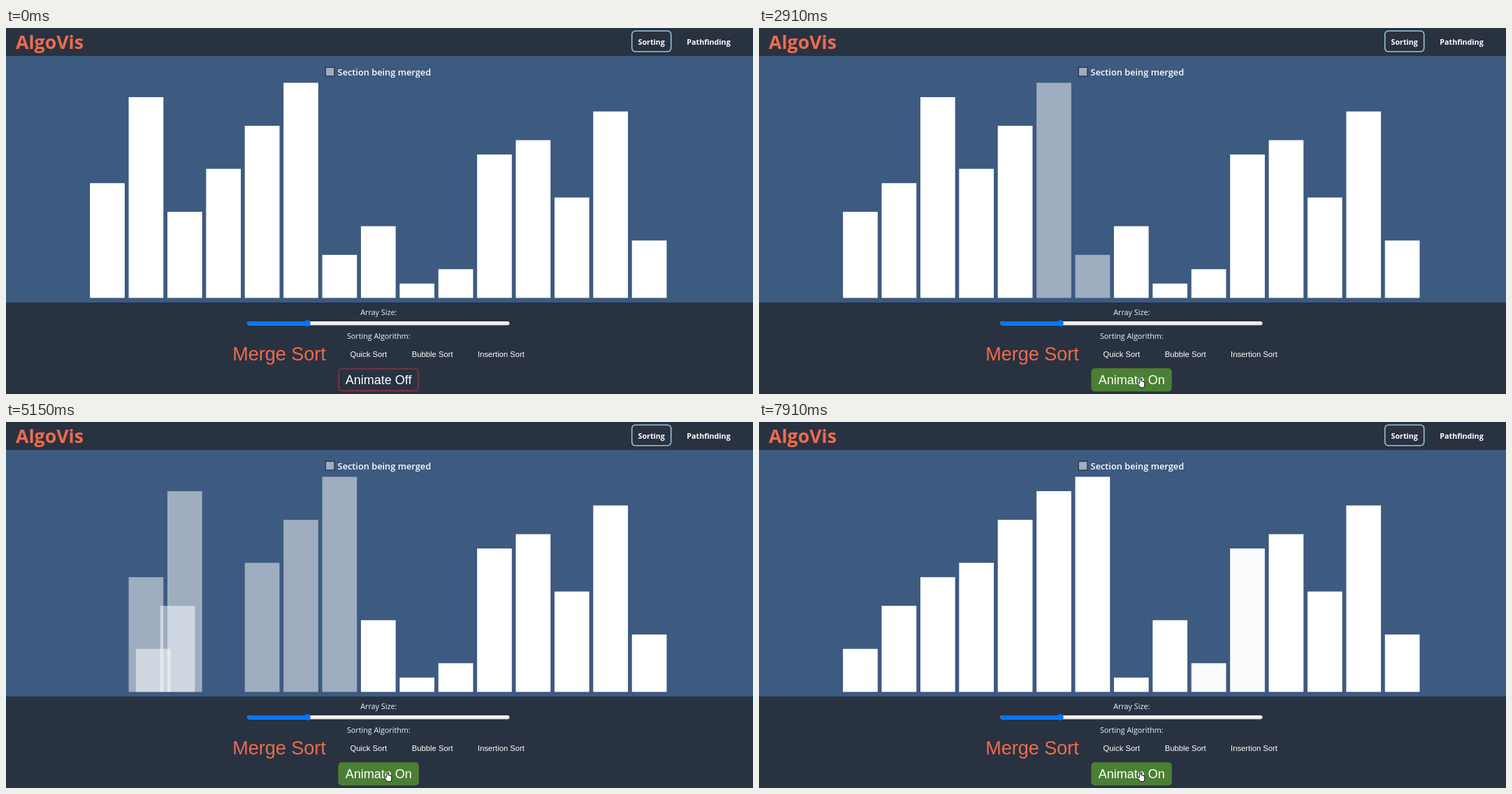
These frames come from a looping animation (1069x524 px, 8 s). An HTML page:

```html
<!DOCTYPE html>
<html lang="en">
<head>
<meta charset="utf-8">
<title>Sorting visualizer</title>
<style>
  html, body { margin: 0; width: 100%; height: 100%; overflow: hidden; background: #293241; }
  svg { display: block; width: 1069px; height: 524px; }
  text { font-family: "Open Sans", "Noto Sans", sans-serif; fill: #fff; }
  .arial { font-family: "Liberation Sans", Arial, sans-serif; }
  .mid { text-anchor: middle; }
  .brand { font-size: 26.7px; font-weight: 700; fill: #ee6c4d; }
  .nav { font-size: 10.7px; font-weight: 700; }
  .legend { font-size: 12.8px; font-weight: 600; }
  .label { font-size: 10.75px; fill: #e0fbfc; }
  .algo { font-size: 11.25px; }
  .chosen { font-size: 27px; fill: #ee6c4d; }
  .toggle { font-size: 18px; }
  .pointer path { fill: #fff; stroke: #000; stroke-width: .9; stroke-linejoin: round; }
</style>
</head>
<body>
<svg viewBox="0 0 1069 524">
  <rect width="1069" height="524" fill="#293241"/>
  <rect y="40" width="1069" height="353" fill="#3d5a80"/>

  <text class="brand" x="14" y="30">AlgoVis</text>
  <rect x="895.7" y="4.2" width="56" height="29.6" rx="5" fill="none" stroke="#98c1d9" stroke-width="1.6"/>
  <text class="nav mid" x="923.7" y="23.5">Sorting</text>
  <text class="nav mid" x="1005.5" y="23.5">Pathfinding</text>

  <rect x="457.3" y="56.3" width="12.6" height="12.6" fill="#9eacbf" stroke="#1c2430"/>
  <text class="legend" x="474.6" y="68">Section being merged</text>

  <g id="bars" fill="#fff"></g>

  <text class="label mid" x="533.3" y="411">Array Size:</text>
  <rect x="345.5" y="420" width="375" height="5.4" rx="2.7" fill="#efefef"/>
  <rect x="345.5" y="420" width="88" height="5.4" rx="2.7" fill="#0075ff"/>
  <circle cx="431.3" cy="422.7" r="4.5" fill="#0075ff"/>

  <text class="label mid" x="533.3" y="444.5">Sorting Algorithm:</text>
  <text class="arial chosen" x="324.3" y="476">Merge Sort</text>
  <text class="arial algo" x="492.6" y="471">Quick Sort</text>
  <text class="arial algo" x="580.8" y="471">Bubble Sort</text>
  <text class="arial algo" x="675" y="471">Insertion Sort</text>

  <rect x="476.3" y="488" width="113.6" height="31.4" rx="4.5" fill="none" stroke="#8b3439" stroke-width="1.6"/>
  <rect id="green" x="475.5" y="487.2" width="115.2" height="33" rx="5" fill="#4a8033"/>
  <text id="toggle" class="arial toggle mid" x="533.2" y="509.5">Animate Off</text>

  <g id="arrow" class="pointer"><path d="M0 0V11.5L2.7 9 4.6 13.2 6.3 12.4 4.4 8.4H8.2Z"/></g>
  <g id="hand" class="pointer"><path d="M3.5 9V1.7Q3.5.6 4.5.6T5.5 1.7V5.5Q6.5 4.8 7.3 5.9 8.4 5.4 9 6.5 10.6 6.2 10.8 7.8V11Q10.8 13 9.6 14.8H4.6Q3.5 12.8 1 10 .4 9 1.4 8.5 2.4 8.2 3.5 9Z"/></g>
</svg>
<script>
const LOOP = 8000, SWAP = 200, FADE = 38, CLICK = 1110;
const START = [8, 14, 6, 9, 12, 15, 3, 5, 1, 2, 10, 11, 7, 13, 4];

// [time, action, first slot, last slot]
const STEPS = [
  [1100, 'dim', 0, 1], [1235, 'lift', 0, 1],
  [1365, 'dim', 0, 2], [1629, 'swap', 0, 2], [1899, 'swap', 1, 2], [2169, 'lift', 0, 2],
  [2340, 'dim', 3, 4], [2640, 'lift', 3, 4],
  [2895, 'dim', 5, 6], [3150, 'swap', 5, 6], [3458, 'lift', 5, 6],
  [3740, 'dim', 3, 6], [4000, 'swap', 3, 5], [4265, 'swap', 4, 5], [4559, 'lift', 3, 6],
  [4825, 'dim', 0, 6], [5081, 'swap', 0, 3], [5351, 'swap', 1, 3], [5621, 'swap', 2, 3],
  [5891, 'swap', 3, 4], [6161, 'swap', 4, 5], [6440, 'lift', 0, 6],
  [6690, 'dim', 7, 8], [6950, 'swap', 7, 8], [7225, 'lift', 7, 8],
  [7490, 'dim', 9, 10], [7788, 'lift', 9, 10]
];

const $ = id => document.getElementById(id);
const clamp = v => Math.min(1, Math.max(0, v));

// cubic-bezier(.25, .1, .25, 1)
function ease(x) {
  if (x <= 0 || x >= 1) return clamp(x);
  let lo = 0, hi = 1;
  for (let i = 0; i < 24; i++) {
    const u = (lo + hi) / 2;
    if (.75 * u * (1 - u) + u ** 3 < x) lo = u; else hi = u;
  }
  return .3 * lo * (1 - lo) ** 2 + 3 * lo * lo * (1 - lo) + lo ** 3;
}

const bars = {};
for (const v of START) {
  const bar = document.createElementNS('http://www.w3.org/2000/svg', 'rect');
  const h = v * 20.53;
  bar.setAttribute('width', 49.7);
  bar.setAttribute('height', h);
  bar.setAttribute('y', 386.4 - h);
  bars[v] = $('bars').appendChild(bar);
}

function drawBars(t) {
  const order = [...START], slot = {}, alpha = {};
  order.forEach((v, i) => { slot[v] = i; alpha[v] = 1; });
  for (const [at, action, a, b] of STEPS) {
    if (t < at) break;
    if (action === 'swap') {
      const p = ease((t - at) / SWAP);
      [order[a], order[b]] = [order[b], order[a]];
      slot[order[a]] = b + (a - b) * p;
      slot[order[b]] = a + (b - a) * p;
    } else {
      const level = action === 'dim' ? .5 : 1 - .5 * Math.exp((at - t) / FADE);
      for (let i = a; i <= b; i++) alpha[order[i]] = level;
    }
  }
  for (const v of START) {
    bars[v].setAttribute('x', 120.15 + 55.4 * slot[v]);
    bars[v].setAttribute('opacity', alpha[v]);
  }
}

function drawPointer(t) {
  const p = clamp((t - 90) / 760), e = p * (1.6 - .6 * p);
  const curve = (a, b, c) => a * (1 - e) ** 2 + 2 * b * e * (1 - e) + c * e * e;
  const x = curve(1018, 740, 545), y = curve(520, 459, 501);
  const over = x < 590;
  $('arrow').setAttribute('transform', `translate(${x} ${y})`);
  $('hand').setAttribute('transform', `translate(${x - 4} ${y - 1})`);
  $('arrow').setAttribute('visibility', t >= 100 && !over ? 'visible' : 'hidden');
  $('hand').setAttribute('visibility', over ? 'visible' : 'hidden');
}

function draw(t) {
  drawBars(t);
  drawPointer(t);
  $('green').setAttribute('opacity', ease((t - CLICK) / 300));
  $('toggle').textContent = t < CLICK ? 'Animate Off' : 'Animate On';
}

const begin = performance.now();
function tick() {
  draw((performance.now() - begin) % LOOP);
  requestAnimationFrame(tick);
}
tick();
</script>
</body>
</html>
```
